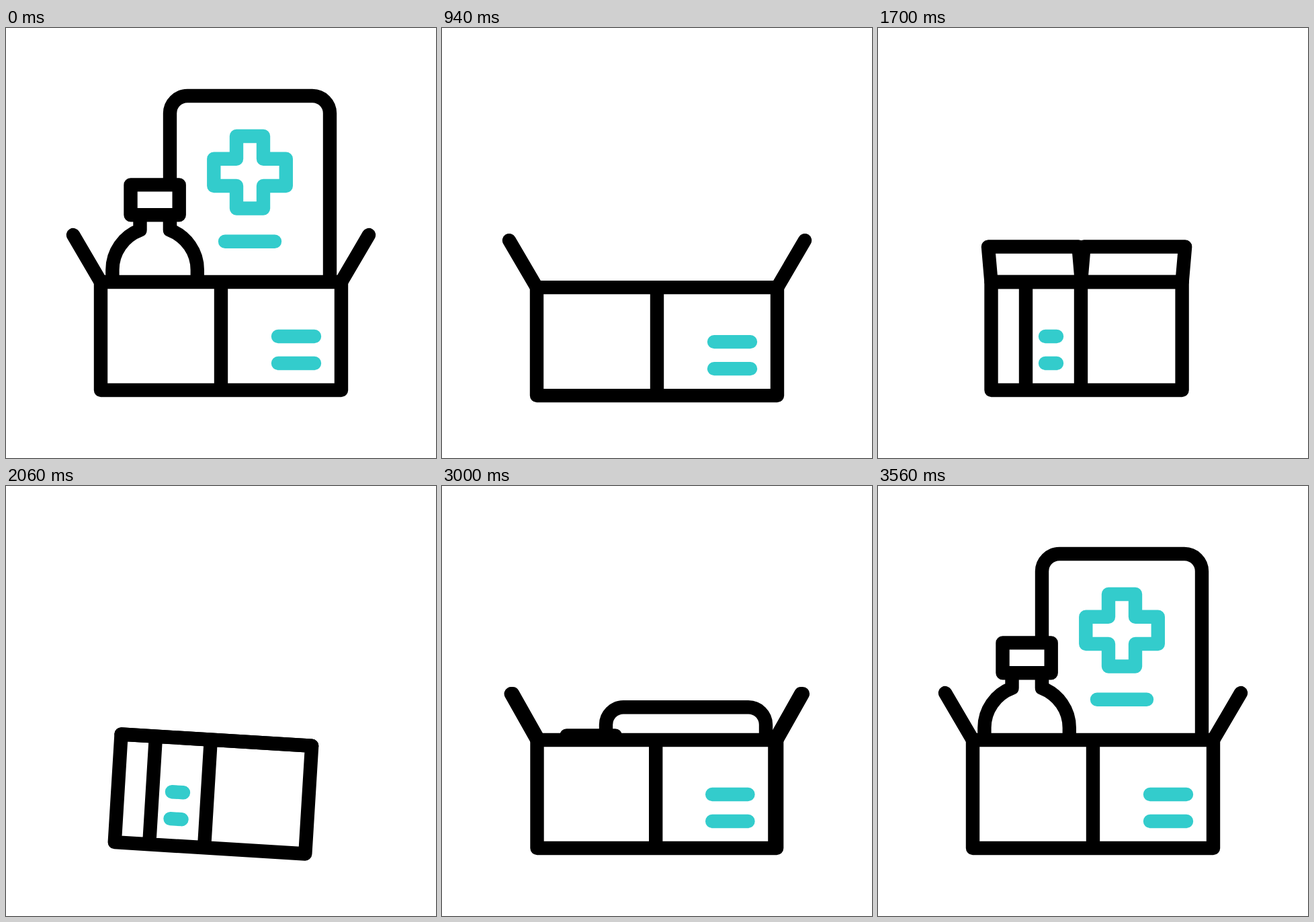
An HTML page that plays this animation: 640 px wide and 640 px high, repeating every 3.6 s.

```html
<!DOCTYPE html>
<html lang="en">
<head>
<meta charset="utf-8">
<title>Medicine box</title>
<style>
  html, body { margin: 0; width: 100%; height: 100%; overflow: hidden; background: #fff; }
  svg { display: block; width: 100vw; height: 100vh; }
  path { fill: none; stroke: #000; stroke-width: 20.4; stroke-linecap: round; stroke-linejoin: round; }
  .teal { stroke: #3cc; }
  .solid { fill: #fff; }
</style>
</head>
<body>
<svg viewBox="0 0 640 640">
  <clipPath id="above"><rect width="640" height="378"/></clipPath>
  <g clip-path="url(#above)">
    <g id="card">
      <path class="solid" d="M244 800V127a26 26 0 0 1 26-26H456a26 26 0 0 1 26 26V800"/>
      <path class="teal" d="M343 161H383V194.7H416.8V235H383V268.5H343V235H309.3V194.7H343Z"/>
      <path class="teal" d="M326 317.8H400"/>
    </g>
    <g id="bottle">
      <path class="solid" d="M199.5 278V300.8A63.2 63.2 0 0 0 158.4 360V700H284.8V360A63.2 63.2 0 0 0 243.9 300.8V278"/>
      <path class="solid" d="M185.5 233.4H257.7V278.3H185.5Z"/>
    </g>
  </g>
  <g id="box">
    <path id="flaps"/>
    <path id="frame"/>
    <path id="label" class="teal"/>
  </g>
  <path class="teal swoosh" pathLength="1" d="M544 345C523 396 470 431.5 397.4 431.5"/>
  <path class="teal swoosh" pathLength="1" d="M544 412.5C518 453 468 474.5 397.4 474.5"/>
</svg>
<script>
const LOOP = 3600, TOP = 378, BOTTOM = 539;
const $ = id => document.getElementById(id);
const swooshes = document.querySelectorAll('.swoosh');
const mix = (a, b, p) => a + (b - a) * p;

// Eased value from a list of [ms, value] steps
function track(steps, t) {
  if (t <= steps[0][0]) return steps[0][1];
  for (let i = 1; i < steps.length; i++) {
    const [t0, a] = steps[i - 1], [t1, b] = steps[i];
    if (t <= t1) {
      const k = (t - t0) / (t1 - t0);
      return mix(a, b, k * k * (3 - 2 * k));
    }
  }
  return steps[steps.length - 1][1];
}

const hop = depth => [[0, 0], [405, -57.7], [800, depth], [2867, depth], [3333, -57.7], [3560, 0]];
const CARD = hop(300), BOTTLE = hop(187);
const BUMP = [[840, 0], [1000, 11.7], [1200, 0]];
const TURN = [[1200, 0], [1600, 1], [2633, 1], [3033, 0]];
const CLOSE = [[1580, 0], [1950, 1], [2633, 1], [3033, 0]];
const ROCK = [[1950, 0], [2110, 4.5], [2270, -4.5], [2430, 4.5], [2590, -4.5], [2750, 0]];
const HEAD = [[1200, 0], [1400, 1]];
const TAIL = [[1400, 0], [1600, 1]];

function flap(x0, x1, lean, y) {
  return `M${x0} ${TOP}L${x0 + lean} ${y}H${x1 + lean}L${x1} ${TOP}Z`;
}

function drawBox(t) {
  const turn = track(TURN, t), close = track(CLOSE, t);
  const left = mix(141, 168.5, turn), right = mix(499, 452.6, turn);
  const front = mix(320, 220, turn), side = mix(499, 302, turn);
  const back = mix(141, 303, turn);
  const lean = mix(mix(41, 29.5, turn), -70, close);
  const y = mix(308, TOP, close);

  $('flaps').setAttribute('d', flap(left, back, -lean, y) + flap(side, right, lean, y));
  $('frame').setAttribute('d',
    `M${left} ${TOP}H${right}V${BOTTOM}H${left}Z` +
    `M${front} ${TOP}V${BOTTOM}M${side} ${TOP}V${BOTTOM}`);
  const a = mix(405, 249, turn), b = mix(459, 266, turn);
  $('label').setAttribute('d', `M${a} 459H${b}M${a} 499H${b}`);
  $('box').setAttribute('transform',
    `translate(0 ${track(BUMP, t)}) rotate(${track(ROCK, t)} 310 424)`);
}

function draw(t) {
  $('card').setAttribute('transform', `translate(0 ${track(CARD, t)})`);
  $('bottle').setAttribute('transform', `translate(0 ${track(BOTTLE, t)})`);
  drawBox(t);
  const head = track(HEAD, t), tail = track(TAIL, t), len = head - tail;
  for (const s of swooshes) {
    s.style.visibility = len > 0.001 ? 'visible' : 'hidden';
    s.style.strokeDasharray = `${len} 3`;
    s.style.strokeDashoffset = -tail;
  }
}

const start = performance.now();
function tick() {
  draw((performance.now() - start) % LOOP);
  requestAnimationFrame(tick);
}
tick();
</script>
</body>
</html>
```
